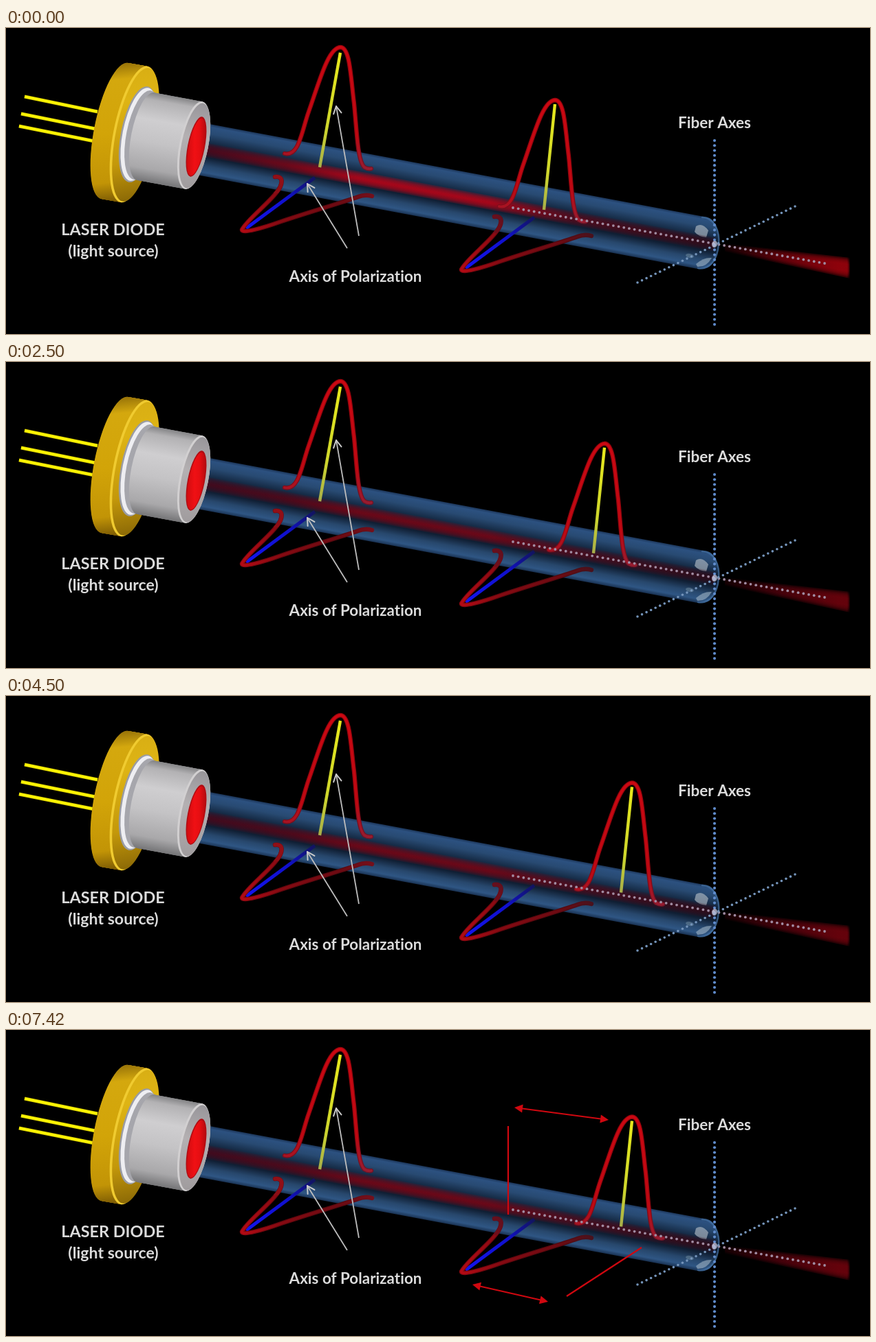
These frames come from a looping animation (1256 px wide and 446 px high, 7.51 s). An HTML page with a canvas:

```html
<!DOCTYPE html>
<html lang="en">
<head>
<meta charset="utf-8">
<title>Laser diode and fiber axes</title>
<style>
html, body { margin: 0; width: 100%; height: 100%; overflow: hidden; background: #000; }
canvas { display: block; width: 1256px; height: 446px; }
</style>
</head>
<body>
<canvas id="stage" width="1256" height="446"></canvas>
<script>
const ctx = document.getElementById('stage').getContext('2d');
const LOOP = 7510, STEP = 83.4, TILT = 0.195;

const clamp = v => Math.max(0, Math.min(1, v));
const ease = v => (1 - Math.cos(Math.PI * clamp(v))) / 2;

function grad(x0, y0, x1, y1, ...stops) {
  const g = ctx.createLinearGradient(x0, y0, x1, y1);
  stops.forEach(([at, color]) => g.addColorStop(at, color));
  return g;
}

function line(x0, y0, x1, y1, color, width, cap = 'butt') {
  ctx.strokeStyle = color;
  ctx.lineWidth = width;
  ctx.lineCap = cap;
  ctx.beginPath();
  ctx.moveTo(x0, y0);
  ctx.lineTo(x1, y1);
  ctx.stroke();
}

function disc(x, y, a, b, fill) {
  ctx.fillStyle = fill;
  ctx.beginPath();
  ctx.ellipse(x, y, a, b, TILT, 0, 7);
  ctx.fill();
}

// Tilted cylinder swept from one disc to another
function sweep(x0, y0, x1, y1, a, b, fill) {
  for (let k = 0; k <= 1; k += 0.02) {
    disc(x0 + (x1 - x0) * k, y0 + (y1 - y0) * k, a, b, fill);
  }
}

function dots(x0, y0, x1, y1, gap, size, color) {
  const n = Math.round(Math.hypot(x1 - x0, y1 - y0) / gap);
  ctx.fillStyle = color;
  for (let i = 0; i <= n; i++) {
    ctx.beginPath();
    ctx.arc(x0 + (x1 - x0) * i / n, y0 + (y1 - y0) * i / n, size / 2, 0, 7);
    ctx.fill();
  }
}

function label(text, x, y, size) {
  ctx.font = `bold ${size}px Lato, Carlito, "Open Sans", sans-serif`;
  ctx.letterSpacing = '0.02px'; // also turns ligatures off
  ctx.textAlign = 'center';
  ctx.fillStyle = '#dcdcdc';
  ctx.fillText(text, x, y);
}

function drawTube() {
  ctx.fillStyle = grad(650, 206.6, 636, 281.3,
    [0, '#1c365a'], [0.05, '#2c5180'], [0.18, '#284a72'], [0.36, '#152a44'],
    [0.5, '#0b1424'], [0.64, '#101f34'], [0.8, '#27476c'], [0.93, '#2f5684'], [1, '#1a3354']);
  ctx.beginPath();
  ctx.moveTo(272, 135.5);
  ctx.lineTo(1020, 276);
  ctx.bezierCurveTo(1031, 279, 1038, 297, 1037, 315);
  ctx.bezierCurveTo(1035, 338, 1024, 353, 1008, 351.5);
  ctx.lineTo(272, 213);
  ctx.fill();

  // rounded tip
  ctx.strokeStyle = 'rgba(74,120,172,0.6)';
  ctx.lineWidth = 2.5;
  ctx.beginPath();
  ctx.moveTo(1012, 276);
  ctx.bezierCurveTo(1030, 276, 1038, 297, 1036, 315);
  ctx.bezierCurveTo(1034, 338, 1024, 352, 1006, 350);
  ctx.stroke();
  ctx.fillStyle = 'rgba(165,176,188,0.7)';
  ctx.beginPath();
  ctx.moveTo(1003, 289);
  ctx.quadraticCurveTo(1012, 283, 1021, 295);
  ctx.lineTo(1018, 305);
  ctx.quadraticCurveTo(1006, 304, 1001, 297);
  ctx.fill();
  ctx.fillStyle = 'rgba(150,172,190,0.65)';
  ctx.beginPath();
  ctx.moveTo(1003, 344);
  ctx.quadraticCurveTo(1014, 334, 1026, 335);
  ctx.quadraticCurveTo(1018, 349, 1005, 348);
  ctx.fill();
  disc(994, 332, 6, 3, 'rgba(125,150,168,0.45)');
}

function drawBeam(glow) {
  const core = `rgb(${135 + 60 * glow},4,${20 + 4 * glow})`;
  const near = `rgb(${95 + 30 * glow},6,24)`;
  const tint = grad(290, 0, 1030, 0, [0, '#50081c'], [0.16, near], [0.3, core], [0.56, core],
    [0.72, '#5c0a1c'], [1, '#340a18']);
  for (let w = 4; w <= 20; w += 4) {
    ctx.globalAlpha = 0.24 + 0.05 * glow;
    line(290, 177.5, 1030, 315.5, tint, w);
  }
  // light leaving the fiber
  const out = 108 + 45 * glow;
  for (let k = 0; k < 5; k++) {
    const s = 1 - k * 0.15;
    ctx.globalAlpha = 0.4;
    ctx.fillStyle = grad(1045, 0, 1227, 0, [0, 'rgba(60,0,8,0.2)'], [0.45, `rgba(${out * 0.75},2,12,0.75)`],
      [0.9, `rgb(${out},3,12)`], [0.975, `rgb(${out},3,12)`], [1, `rgba(${out},3,12,0)`]);
    ctx.beginPath();
    ctx.moveTo(1045, 320 - 6 * s);
    ctx.lineTo(1227, 350 - 15 * s);
    ctx.lineTo(1227, 350 + 15 * s);
    ctx.lineTo(1045, 320 + 6 * s);
    ctx.fill();
  }
  ctx.globalAlpha = 1;
}

function drawDiode() {
  for (const [x0, y0, x1, y1] of [[27, 100, 133, 122], [22, 125, 130, 147], [19, 143, 126, 164.5]]) {
    line(x0, y0, x1, y1, '#cfc400', 5);
    line(x0, y0, x1, y1, '#fbf404', 3.6);
  }
  // gold flange
  sweep(158, 150, 187, 155, 30, 101, grad(150, 52, 170, 254,
    [0, '#947008'], [0.12, '#d4a80e'], [0.5, '#d2a408'], [0.85, '#c29406'], [1, '#765604']));
  disc(186, 155, 30, 101, '#f0cb30');
  disc(188.5, 155.5, 29, 99, grad(165, 60, 200, 250,
    [0, '#d8ae14'], [0.25, '#deb414'], [0.7, '#c4980a'], [1, '#8a6806']));

  // silver collar and can
  disc(192, 155, 25, 71, '#9a9ca4');
  disc(193.5, 155, 24, 69, '#eeeef2');
  disc(198, 156, 23, 66, '#a6a6ac');
  sweep(203, 158, 273, 171, 21, 65, grad(245, 100, 222, 228,
    [0, '#858587'], [0.08, '#b3b2b4'], [0.3, '#cfced0'], [0.55, '#c4c3c5'], [0.85, '#a9a8aa'], [1, '#747476']));
  disc(273, 171, 21, 65, '#d2d0d1');
  disc(274.5, 171.5, 19.5, 63, grad(282, 110, 265, 234, [0, '#98969a'], [0.4, '#b4b0b2'], [1, '#a09c9e']));
  disc(276.5, 173, 12.5, 44.5, '#b00c12');
  disc(276.5, 173.5, 11, 42.5, grad(263, 0, 291, 0,
    [0, '#d00c10'], [0.4, '#f01014'], [0.65, '#e60e12'], [1, '#b40a0e']));
}

// Tube-shaped stroke: dark rim with a lighter core
function tubeStroke(path, rim, core) {
  ctx.lineCap = 'round';
  ctx.lineJoin = 'round';
  ctx.strokeStyle = rim;
  ctx.lineWidth = 6.4;
  ctx.stroke(path);
  ctx.strokeStyle = core;
  ctx.lineWidth = 3.8;
  ctx.stroke(path);
}

const upright = new Path2D('M405 183 C426 188 430 150 440 122 C455 80 468 29 486 28 ' +
  'C500 28 501 70 506 110 C510 150 511 194 521 203 Q526 206 531 205');
const flat = new Path2D('M391 217 C404 215 403 228 393 240 C380 257 350 280 343 294 ' +
  'C343 300 372 292 400 282 C445 267 490 254 512 246 Q522 242 532 245');

function drawUpright(dx, dy) {
  ctx.save();
  ctx.translate(dx, dy);
  tubeStroke(upright,
    grad(0, 25, 0, 206, [0, '#94040c'], [0.72, '#8c060e'], [1, '#6c1426']),
    grad(0, 25, 0, 206, [0, '#cc0812'], [0.72, '#be0812'], [1, '#961c30']));
  ctx.restore();
}

function drawFlat(dx, dy, dim) {
  ctx.save();
  ctx.translate(dx, dy);
  const start = dim ? '#62101f' : '#921018';
  const end = dim ? '#48121d' : '#74101c';
  line(349, 292, 449, 218, grad(349, 292, 449, 218, [0, '#1414ee'], [0.6, '#1010cc'], [1, '#12145c']), 5);
  tubeStroke(flat, grad(340, 0, 535, 0, [0, '#880810'], [0.3, '#64060c'], [0.75, '#54080e'], [1, end]),
    grad(340, 0, 535, 0, [0, '#b60a14'], [0.3, '#860a12'], [0.75, '#6c0a12'], [1, end]));
  // brighter hook at the near end
  ctx.beginPath();
  ctx.rect(380, 205, 30, 36);
  ctx.clip();
  ctx.strokeStyle = grad(340, 300, 400, 215, [0, '#a80a14'], [0.45, '#860a12'], [1, start]);
  ctx.lineWidth = 5.4;
  ctx.stroke(flat);
  ctx.restore();
}

function yellow(x0, y0, x1, y1) {
  line(x0, y0, x1, y1, grad(x0, y0, x1, y1, [0, '#e6e81c'], [0.65, '#ced62c'], [1, '#a6ae4a']), 4.4);
}

function pointer(x0, y0, x1, y1) {
  const a = Math.atan2(y1 - y0, x1 - x0);
  line(x0, y0, x1, y1, '#bcbcbc', 1.8);
  for (const s of [-0.5, 0.5]) {
    line(x1, y1, x1 - 12 * Math.cos(a + s), y1 - 12 * Math.sin(a + s), '#cacaca', 2, 'round');
  }
}

function head(x, y, a) {
  ctx.save();
  ctx.translate(x, y);
  ctx.rotate(a);
  ctx.beginPath();
  ctx.moveTo(0, 0);
  ctx.lineTo(-12, -6);
  ctx.lineTo(-12, 6);
  ctx.fill();
  ctx.restore();
}

function doubleArrow(x0, y0, x1, y1, color) {
  const a = Math.atan2(y1 - y0, x1 - x0), c = 8 * Math.cos(a), s = 8 * Math.sin(a);
  line(x0 + c, y0 + s, x1 - c, y1 - s, color, 2);
  ctx.fillStyle = color;
  head(x1, y1, a);
  head(x0, y0, a + Math.PI);
}

function drawGuides(alpha) {
  const red = '#d00810';
  ctx.globalAlpha = alpha;
  line(730, 140, 730, 269, red, 2.2);
  line(815, 388, 924, 317, red, 2.2);
  doubleArrow(739, 113, 876, 131, red);
  doubleArrow(678, 371, 788, 396, red);
  ctx.globalAlpha = 1;
}

function draw(t) {
  const move = ease((t - 370) / 3600);
  const dx = 112 * move, dy = 21.5 * move;

  ctx.fillStyle = '#000';
  ctx.fillRect(0, 0, 1256, 446);
  drawTube();
  drawBeam(clamp(1 - t / 900));
  drawDiode();

  drawFlat(0, 0, false);
  drawFlat(319, 58, true);
  yellow(486, 36, 456, 203);
  drawUpright(0, 0);
  yellow(798 + dx, 111 + dy, 782 + dx, 265 + dy);
  drawUpright(312 + dx, 77 + dy);

  dots(737, 262, 1190, 343, 7.8, 3.8, '#a08ca2');
  dots(918, 371, 1147, 260, 7.2, 3.6, '#7494ba');
  dots(1030, 164, 1030, 432, 7.2, 4.2, '#608ccc');
  disc(1030, 315, 4, 5, 'rgba(195,195,218,0.75)');

  drawGuides(clamp((t - 4550) / 1950));
  pointer(513, 303, 480, 114);
  pointer(496, 321, 438, 227);

  label('LASER DIODE', 155.5, 302, 23.4);
  label('(light source)', 156, 333, 23.1);
  label('Axis of Polarization', 508, 370, 22.4);
  label('Fiber Axes', 1030, 146, 22.5);
}

const begin = performance.now();
function tick(now) {
  const t = Math.max(0, now - begin) % LOOP;
  draw(Math.min(89, Math.floor((t + 9) / STEP)) * STEP);
  requestAnimationFrame(tick);
}
draw(0);
requestAnimationFrame(tick);
</script>
</body>
</html>
```
